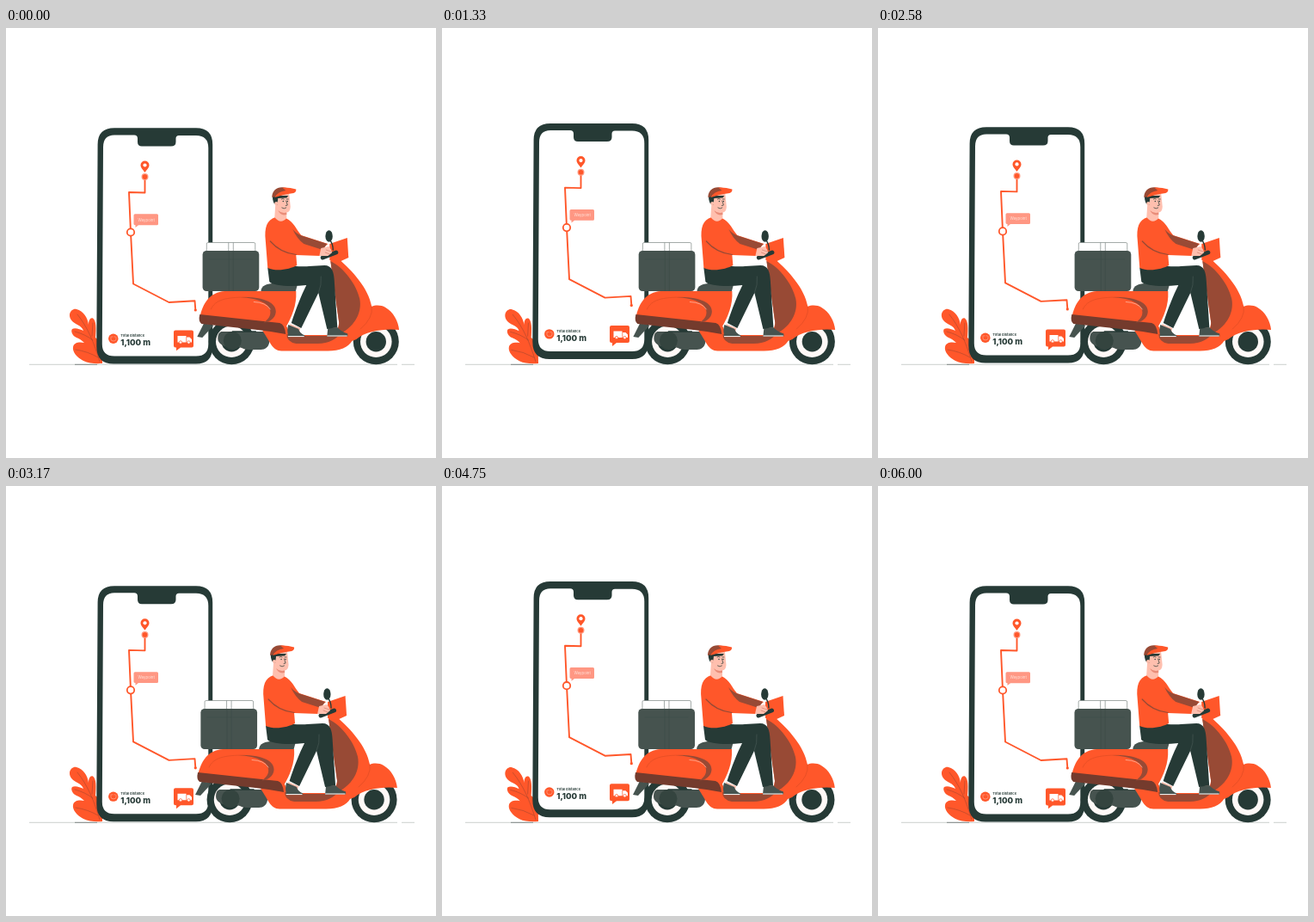
Animation, 500 px wide and 500 px high, one loop 6.04 s. Source, as an HTML page:

```html
<!DOCTYPE html>
<html lang="en">
<head>
<meta charset="utf-8">
<title>Delivery scooter</title>
<style>
  html, body { margin: 0; width: 100%; height: 100%; overflow: hidden; background: #fff; }
  svg { display: block; width: 100%; height: 100%; }
  text { font-family: Inter, "Open Sans", sans-serif; }
  .o { fill: #ff572a; }
  .d { fill: #263a36; }
  .g { fill: #46534f; }
  .b { fill: #984a35; }
  .s { fill: #ffbfae; }
  .w { fill: #fff; }
  .line { fill: none; stroke-linecap: round; stroke-linejoin: round; }
</style>
</head>
<body>
<svg viewBox="0 0 500 500">
  <path d="M27 391.3H455M460 391.3H475" stroke="#b5bab8" stroke-width=".7"/>
  <path d="M80 391.300H106" stroke="#5c6663" stroke-width=".7"/>

  <g id="leaf">
    <path class="o" d="M112 390C104 390.500 96 390 90 387C82 383 77 376 78 371C79 365 86 365 91 366C88 363 85 361 82 360C77 358 75 352 77 350C80 348 86 350 90 352C89 349 87 347 83 345C77 342 73.500 338 74 333C75 328 79 326 82 327C90 329 95 337 96 345C96 340 98 336.500 101 337.500C105 340 105 350 104 360C109 364 112 370 112 380Z"/>
    <path class="line" d="M83 333C95 348 102 365 109 388M80 353Q92 356 101 363M81 374Q95 376 107 383M101 343L100 358" stroke="#a8472e" stroke-width=".6"/>
  </g>

  <g id="phone">
    <path class="d" d="M126 116.800H221Q240.200 116.800 240.200 136V371Q240.200 391 221 391H125Q105.300 391 105.300 371L106.600 136Q106.600 116.800 126 116.800Z"/>
    <path class="w" d="M126 125H149Q153 125 153 129V133Q153 138 158 138H192Q197.500 138 197.500 133V129Q197.500 125.500 201 125.500H221Q235.300 125.500 235.300 140V368Q235.300 382 221 382H126Q111.800 382 111.800 368L113 139Q113 125 126 125Z"/>
    <path class="line" d="M161.500 174V192L143 191.500L145 238L148 298L189.500 319.500L219.500 317.800L220.300 328" stroke="#ff572a" stroke-width="1.900"/>
    <circle class="o" cx="220.300" cy="328.500" r="1.600"/>
    <circle cx="145" cy="238" r="4.200" fill="#fff" stroke="#ff572a" stroke-width="1.800"/>
    <circle cx="161.500" cy="173.600" r="4" fill="#ff9b83"/>
    <circle class="o" cx="161.500" cy="173.600" r="2.800"/>
    <path class="o" d="M161.500 168.500C159 165 156.500 163 156.500 160A5 5 0 0 1 166.500 160C166.500 163 164 165 161.500 168.500Z"/>
    <circle class="w" cx="161.500" cy="160" r="2.100"/>
    <path d="M150 216.800H175.500Q177 216.800 177 218.300V228.200Q177 229.700 175.500 229.700H154L150.500 232.500V229.700Q148.500 229.700 148.500 228.200V218.300Q148.500 216.800 150 216.800Z" fill="#ff9783"/>
    <text x="153.500" y="225" font-size="4.400" fill="#ffe3db">Waypoint</text>

    <circle class="o" cx="124.800" cy="361.800" r="5.700"/>
    <path class="line" d="M122 359.500V362.500Q122 364.500 125 364.500T128 362.500V360M123 359.500H124M126 359.500H127" stroke="#ffb39f" stroke-width=".6"/>
    <text x="133.300" y="359.500" font-size="4.100" font-weight="600" fill="#263a36">Total distance</text>
    <text x="133.200" y="369.500" font-size="9.500" font-weight="800" fill="#263a36">1,100 m</text>
    <path class="o" d="M197 352H216Q218 352 218 354V370Q218 372 216 372H203L198 375.800V372H197Q195 372 195 370V354Q195 352 197 352Z"/>
    <path class="w" d="M199.500 358.500H209.500V366H199.500ZM210.200 360H213.500L216 362.500V366H210.200Z"/>
    <g fill="#fff" stroke="#ff572a" stroke-width=".7">
      <circle cx="203" cy="366" r="1.700"/><circle cx="212.500" cy="366" r="1.700"/>
    </g>
  </g>

  <g id="scooter">
    <g id="wheel">
      <circle class="d" cx="262" cy="364.700" r="26.500"/>
      <circle cx="262" cy="364.700" r="18.300" fill="#fff9f7"/>
      <circle class="d" cx="262" cy="364.700" r="11.700"/>
    </g>
    <use href="#wheel" x="168"/>
    <path class="g" d="M230 343L241 346L228 360L222 359Z"/>
    <path class="g" d="M250 353H302C309 361 307 374 296 374H282C274 374 274 370 264 371C252 371 246 367 246 361Q246 354 250 353Z"/>
    <circle cx="263" cy="363.500" r="10.500" fill="#34443f"/>
    <path class="line" d="M263 353H290" stroke="#263a36" stroke-width="1.500"/>

    <!-- floor, leg shield and front fender -->
    <path class="o" d="M298 352L325 345L331 357H376Q386 354 387 343L377 270L387 269C402 282 421 302 425 324C429 322 436 322 441 325C450 330 456 341 456.800 351C442 349 418 352 407 362L402 364C398 371 388 375.500 374 375.500H320C309 375 307 365 298 352Z"/>
    <path class="b" d="M377 271C393 279 407 298 411 315C414 331 405 346 391 354C382 362 376 367 362 367H337Q326 365 326 356L336 358H374Q387 355 387 343Z"/>
    <path class="line" d="M425 324Q427 337 412 350" stroke="#d94a24" stroke-width=".6"/>

    <!-- seat and rear cowl -->
    <path class="g" d="M296 307C296 299 304 297 312 297H339L336 308Z"/>
    <path class="o" d="M225 337C228 320 237 307 254 306H337C338 322 332 336 325 348Z"/>
    <path d="M225 333L318 343Q324 345 325 356Q310 353 292 351L227 344Q223 341 225 333Z" fill="#743b2d"/>
    <path class="b" d="M272 313C301 312 314 320 313.500 330C313 338 306 342 299 342.500C307 338 310 330 304 323C297 316 285 314 272 313Z"/>
    <path class="line" d="M288 318.500Q302 319 307 327" stroke="#ffc3b1" stroke-width=".7"/>
    <path class="line" d="M238 327C243 316 255 313 280 313" stroke="#df4c25" stroke-width=".7"/>

    <!-- cargo -->
    <g fill="#fff" stroke="#7d8784" stroke-width=".7">
      <rect x="233" y="249.500" width="56.500" height="13" rx="1.500"/>
      <path d="M258.500 249.500V260M264 249.500V260"/>
    </g>
    <rect class="g" x="228.300" y="259" width="65.700" height="47" rx="4.500"/>
    <path class="line" d="M236 269H286M259 260V305M264 260V305" stroke="#3b4844" stroke-width=".5"/>

    <!-- handlebar -->
    <path class="o" d="M376 251L396.500 244L398 267L387 272L376 270Z"/>
    <path class="line" d="M376 246Q380 251 380 258" stroke="#263a36" stroke-width="1.400"/>
    <ellipse class="d" cx="375.300" cy="242" rx="4.200" ry="6.800"/>
    <path class="line" d="M368 267L383.500 261" stroke="#263a36" stroke-width="5"/>

    <!-- rider -->
    <path class="s" d="M330 344L342 349L341 353L330 350ZM374 347L384 346V352H375Z"/>
    <path class="g" d="M328 345L340 350Q341 355 347 357.500V359H328Q326 351 328 345ZM374 349L385 348Q389 353 397 355.500V358.500H373Z"/>
    <path class="line" d="M328 358.600H346M373.500 358H396" stroke="#fff" stroke-width="1"/>
    <path class="d" d="M304 279C305 274 340 278 352 277L370 276C379 276 381 284 381.500 294L385 348L373 350L363 308L343 349L331.500 343C337 326 343 311 349 299C331 301 310 300 306 295Z"/>
    <path class="line" d="M363 308Q367 299 366 289" stroke="#53635f" stroke-width=".5"/>
    <path class="o" d="M313 220C303 223 300 232 301.500 247L304 279C315 284 331 280 338 276L337 264L365 265L367 257L374 251L343 241C337 234 335 226 325 221Z"/>
    <path class="b" d="M333 234Q338 240 345 242L373 251L368 258L346 251Q338 245 333 234Z"/>
    <path class="line" d="M307 248C314 256 323 262 337 263.500" stroke="#984a35" stroke-width="1.200"/>
    <path class="s" d="M366 256L375 254Q378 257 379 261L374 265H364Z"/>
    <path class="line" d="M372 258L378 260M371 261L376 263" stroke="#c97562" stroke-width=".6"/>

    <path class="s" d="M312 193H329L330.500 208Q330 214 326 214.500V221Q319 229 312 220L313 205Z"/>
    <path d="M316 212Q320 216 326 214.500V217Q319 219 316 212Z" fill="#e98d79"/>
    <path class="d" d="M310 195H328L326 197.500L316 198L315 206L311.500 204Q309 199 310 195Z"/>
    <path class="b" d="M309 197C309 188 316 184 323 185.500L330 186.500L327 192.500Z"/>
    <path class="o" d="M321 185.500Q329 185 337 187.500Q337.500 190.500 334 192Q323 193 312 197Q316 190 325 189Z"/>
    <circle class="s" cx="314" cy="204" r="2.100"/>
    <path class="line" d="M320 199Q321.500 197.800 323 199M326 199H328M325.500 201L327 206L325 206.500M320.500 209Q323 211 325.500 209" stroke="#263a36" stroke-width=".7"/>
    <circle class="d" cx="322" cy="201.500" r=".7"/><circle class="d" cx="327" cy="201.500" r=".7"/>
  </g>
</svg>
<script>
  const LOOP = 6040;
  const [leaf, phone, scooter] = ["leaf", "phone", "scooter"].map(id => document.getElementById(id));
  const start = performance.now();
  const wave = (u, cycles, shift = 0) => Math.cos(2 * Math.PI * (u * cycles - shift));

  function draw(now) {
    const u = Math.max(0, now - start) % LOOP / LOOP;
    const lift = (1 - wave(u, 2)) / 2;
    phone.setAttribute("transform", `translate(0 ${-0.5 - 5.6 * lift})`);
    leaf.setAttribute("transform", `rotate(${-0.7 * lift} 109 389)`);
    scooter.setAttribute("transform", `translate(${-0.8 + 1.2 * wave(u, 5, 0.07)} 0)`);
    requestAnimationFrame(draw);
  }
  draw(start);
</script>
</body>
</html>
```
